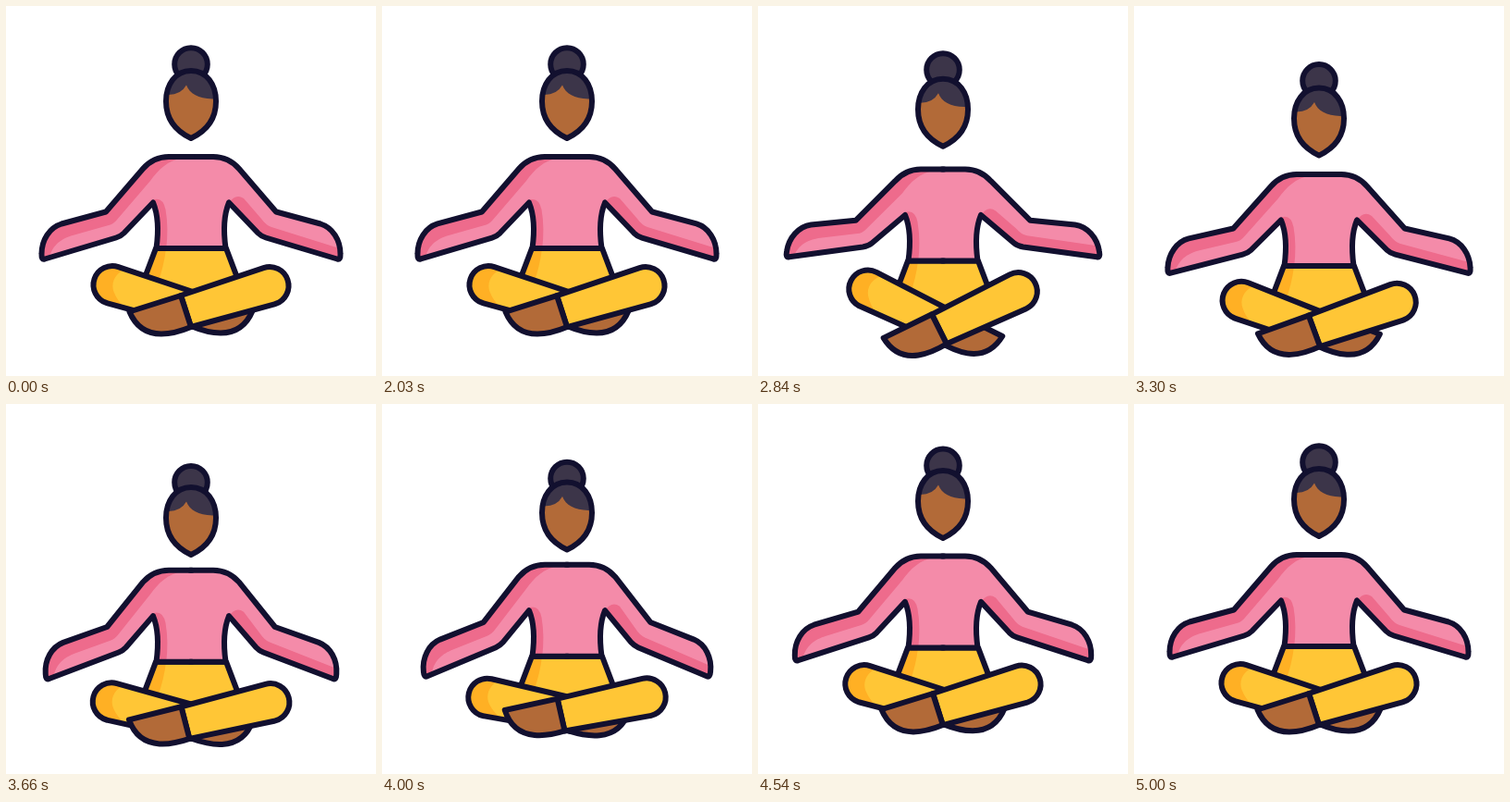
An HTML page with a canvas for the animation above (5.06 s loop, 400 px wide and 400 px high).

```html
<!DOCTYPE html>
<html lang="en">
<head>
<meta charset="utf-8">
<title>Lotus pose</title>
<style>
html, body { margin: 0; width: 100%; height: 100%; overflow: hidden; background: #fff; }
canvas { display: block; width: 400px; height: 400px; }
</style>
</head>
<body>
<canvas id="stage" width="400" height="400"></canvas>
<script>
const ctx = document.getElementById('stage').getContext('2d');
const LOOP = 5060, BEGIN = 2000;
const LINE = '#12102f', PINK = '#f48ba9', ROSE = '#ee6b8c', YELLOW = '#ffc636',
      AMBER = '#ffb024', SKIN = '#b26a38', HAIR = '#3c3549';

// Sine ease from 0 to 1 between two times
function ease(t, from, to) {
  const u = Math.min(1, Math.max(0, (t - from) / (to - from)));
  return (1 - Math.cos(Math.PI * u)) / 2;
}

// Sink to a depth and rise again
const dip = (t, from, peak, to, depth) => depth * (ease(t, from, peak) - ease(t, peak, to));

// Swing one way, then the other, then settle
const swing = (t, first, second, end, a, b) =>
  a * ease(t, BEGIN, first) + (b - a) * ease(t, first, second) - b * ease(t, second, end);

const torsoDrop = t => dip(t, BEGIN, 3320, 4800, 19);
const legDrop = t => dip(t, BEGIN, 3080, 4450, 23);
const faceDrop = t => dip(t, 2250, 3550, 4800, 20.4);
const bunDrop = t => dip(t, 2400, 3650, 4850, 21.8);
const legTilt = t => swing(t, 2700, 3950, 4650, -9, 5.3);
const armLift = t => swing(t, 2720, 3950, 4800, 9.3, -6.2);

function at(dx, dy, draw) {
  ctx.save();
  ctx.translate(dx, dy);
  draw();
  ctx.restore();
}

function mirrored(draw) {
  ctx.save();
  ctx.translate(400, 0);
  ctx.scale(-1, 1);
  draw();
  ctx.restore();
}

function paint(path, fill, shades = [], shadeColor) {
  ctx.fillStyle = fill;
  ctx.fill(path);
  ctx.save();
  ctx.clip(path);
  ctx.fillStyle = shadeColor;
  shades.forEach(s => ctx.fill(s));
  ctx.restore();
}

function shape(path, fill, shades, shadeColor) {
  paint(path, fill, shades, shadeColor);
  ctx.stroke(path);
}

function turn(x, y, cx, cy, deg) {
  const a = deg * Math.PI / 180, c = Math.cos(a), s = Math.sin(a);
  return [cx + (x - cx) * c - (y - cy) * s, cy + (x - cx) * s + (y - cy) * c];
}

// The forearm turns fully about the elbow, the upper arm half as far about the shoulder
function body(lift) {
  const text = p => p.join(' ') + ' ';
  const upper = (x, y) => turn(x, y, 160, 190, lift / 2);
  const [ex, ey] = upper(118, 236);
  const u = (x, y) => text(upper(x, y));
  const f = (x, y) => text(turn(x - 118 + ex, y - 236 + ey, ex, ey, lift));

  const half = new Path2D(
    'M201 163 L176 163 C164 163 155 168 148 176 L' + u(108, 222.5) + 'L' + f(60, 235.5) +
    'C' + f(47, 239.5) + f(38.5, 253) + f(38.5, 268) + 'Q' + f(38.2, 275) + f(42, 273.5) +
    'L' + f(119, 250.5) + 'Q' + u(124, 249) + u(127.5, 245.5) +
    'L159 212.5 C165 227 165 244 162.5 262 L201 262');
  const outer = new Path2D(
    'M192 158 L140 158 L' + u(98, 218) + 'L' + f(50, 230) + 'L' + f(30, 250) +
    'L' + f(34, 280) + 'L' + f(46, 276) + 'C' + f(49, 257) + f(62, 251) + f(72, 248) +
    'L' + f(111, 237) + 'Q' + u(116, 236) + u(120, 231) + 'L156 189 C165 177 174 167 192 164 Z');
  const flank = new Path2D('M156 211 Q169 204 172.5 220 Q176 240 173 264 L156 264 Z');
  const under = new Path2D(
    'M159 213 Q152 202 143 208 L' + u(124, 230) + 'Q' + u(119, 237) + f(113, 239) +
    'L' + f(36, 263) + 'L' + f(36, 279) + 'L' + f(124, 254) + 'L' + u(131, 247) + 'Z');

  mirrored(() => paint(half, PINK, [under], ROSE));
  paint(half, PINK, [outer, flank], ROSE);
  mirrored(() => ctx.stroke(half));
  ctx.stroke(half);
}

const shorts = new Path2D('M162 262 L146.5 303 L175 330 L225 330 L253.5 303 L238 262 Z');
const shortsShade = new Path2D('M162 262 L173 262 Q171 280 164 300 L146.5 303 Z');
const hips = new Path2D('M146.5 303 L162 262 L238 262 L253.5 303');

function pelvis() {
  paint(shorts, YELLOW, [shortsShade], AMBER);
  ctx.stroke(hips);
}

const shin = new Path2D();
shin.moveTo(189, 313);
shin.arc(285, 302.5, 20.5, -1.895, 1.312);
shin.lineTo(200, 347);
shin.closePath();
const foot = new Path2D('M133.5 330.5 L189 313 L200 347 Q182 354.5 168 354.5 C152 354.5 140 346 133.5 330.5 Z');
const kneeShade = new Path2D('M266 284 C281 287 288 300 283 311 Q280 319 271 328 L310 328 L310 278 Z');

function leg(t, shades) {
  const tilt = legTilt(t);
  at(189 + tilt * 0.12, 313 + legDrop(t), () => {
    ctx.rotate(tilt * Math.PI / 180);
    ctx.translate(-189, -313);
    shape(shin, YELLOW, shades, AMBER);
    shape(foot, SKIN);
  });
}

const bun = new Path2D();
bun.arc(200, 63, 17.8, 0, Math.PI * 2);
const face = new Path2D('M200 70 C217 70 227 85 227 103 C227 122 217 135 200 143 C183 135 173 122 173 103 C173 85 183 70 200 70 Z');
const fringe = new Path2D('M170 95.5 Q188 98 195 85.5 C199 96 211 102 230 100 L230 66 L170 66 Z');

function draw(t) {
  ctx.fillStyle = '#fff';
  ctx.fillRect(0, 0, 400, 400);
  ctx.strokeStyle = LINE;
  ctx.lineWidth = 6;
  ctx.lineJoin = ctx.lineCap = 'round';

  at(0, bunDrop(t), () => shape(bun, HAIR));
  at(0, faceDrop(t), () => shape(face, SKIN, [fringe], HAIR));
  at(0, torsoDrop(t), () => {
    pelvis();
    body(armLift(t));
  });
  // The far leg follows slightly behind
  at(0, -1, () => mirrored(() => leg(t - 50, [kneeShade])));
  leg(t);
}

let start;
function tick(now) {
  if (start === undefined) start = now;
  draw((now - start) % LOOP);
  requestAnimationFrame(tick);
}
draw(0);
requestAnimationFrame(tick);
</script>
</body>
</html>
```
